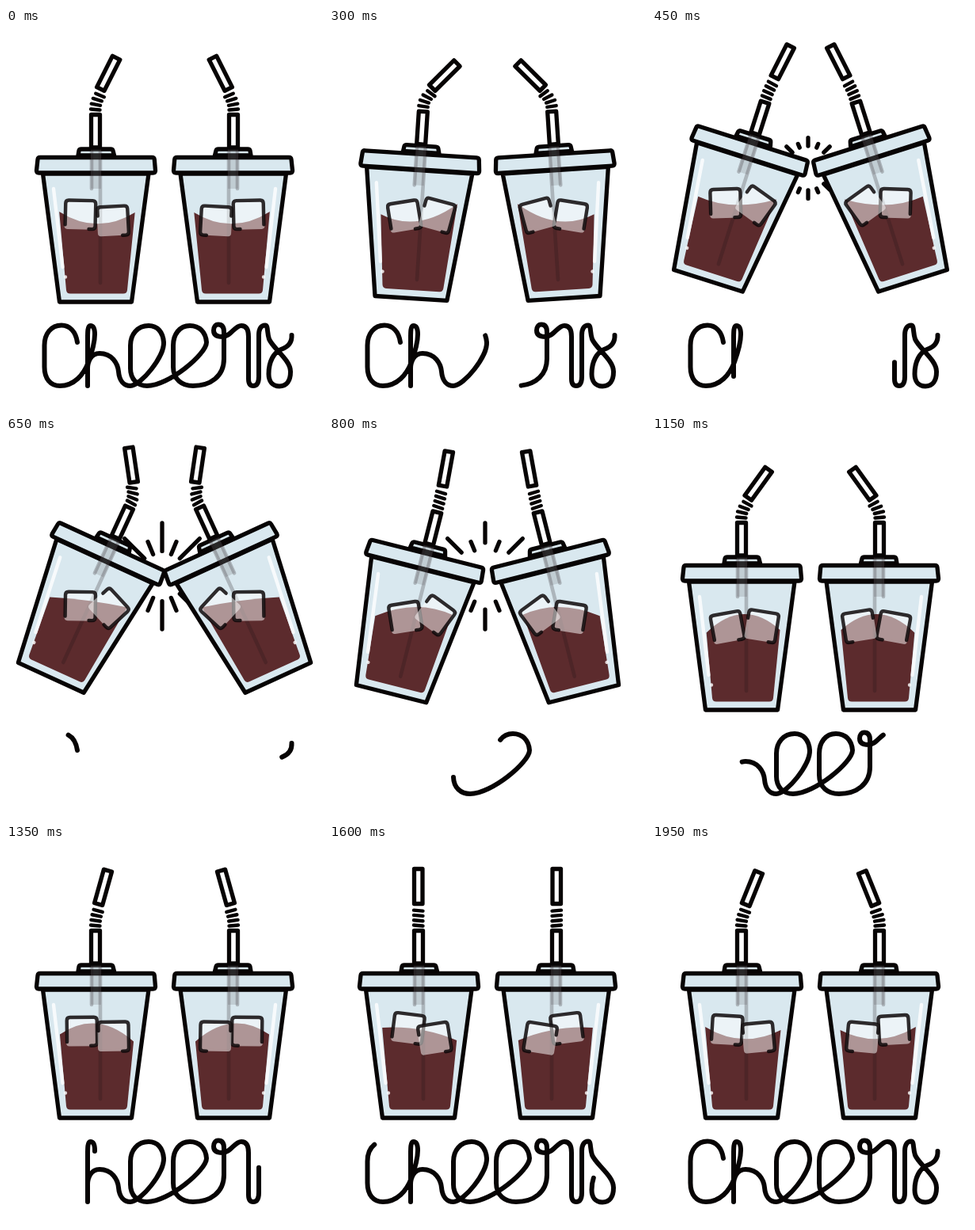
These frames come from a looping animation (400x480 px, 2 s). An HTML page:

```html
<!DOCTYPE html>
<html lang="en">
<head>
<meta charset="utf-8">
<title>Cheers</title>
<style>
  html, body { margin: 0; width: 100%; height: 100%; overflow: hidden; background: #fff; }
  svg { display: block; width: 400px; height: 480px; }
  .ink { stroke: #070404; stroke-width: 5.3; stroke-linejoin: round; stroke-linecap: round; }
  .glass { fill: #d9e8ef; }
  .none { fill: none; }
  .shade { stroke: #201416; stroke-opacity: .24; stroke-width: 4.6; stroke-linecap: round; }
  .shine { stroke: #fff; stroke-opacity: .8; stroke-width: 4.4; stroke-linecap: round; }
  .edge { stroke: #0c0809; stroke-opacity: .85; stroke-width: 4.4; stroke-linecap: round; stroke-linejoin: round; }
  .ice { fill: #fff; fill-opacity: .5; }
</style>
</head>
<body>
<svg viewBox="0 0 400 480">
  <path id="sparks" class="ink none"/>
  <g id="cup">
    <path class="ink glass" d="M46.5 184 67.5 346H158.5L180 184Z"/>
    <path id="drink" fill="#5c2b2d"/>
    <path class="ink glass" d="M91 161 92 155Q92.5 153 95 153H132Q134.5 153 135 155L136.5 161Z"/>
    <path class="ink glass" d="M43 163.5H184Q187 163.5 187.3 166L188.5 180Q188.5 183 185.5 183H41.5Q38.5 183 38.5 180L40 166Q40.3 163.5 43 163.5Z"/>
    <path fill="#808488" fill-opacity=".28" d="M107 153H120V203H107Z"/>
    <path class="shade none" d="M108 154V203M119 154V322"/>
    <g id="cubeA">
      <rect class="ice" x="-20" y="-18.5" width="40" height="37" rx="4"/>
      <path class="edge none" d="M-19 13V-14Q-19-18-15-18H15Q19-18 19-14V14Q19 18 15 18H11"/>
    </g>
    <g id="cubeB">
      <rect class="ice" x="-20" y="-19" width="40" height="38" rx="4"/>
      <path class="edge none" d="M-19-7V-14Q-19-18-15-18H15Q19-18 19-14V15Q19 19 15 19H11"/>
    </g>
    <path class="shine none" d="M60 203 71.5 302M75 314.5V314.6"/>
    <path class="ink" fill="#fff" d="M107.5 109.5H118.5V151H107.5Z"/>
    <g id="bellows"></g>
    <path id="tip" class="ink" fill="#fff" d="M107.5 31.5H118V75.5H107.5Z"/>
  </g>
  <use href="#cup" transform="translate(400) scale(-1 1)"/>
  <path id="word" class="ink none" style="stroke-width:6" pathLength="1" d="M90 397
    C88 383 80 375.5 70 375.5 C57 375.5 48.5 386 48.5 401 L48.5 428 C48.5 443 56 452 68 452
    C86 452 98 438 104 422 C109 408 112 396 112 387 C112 380 110 376 106.5 376 C103 376 103 384 103 392 L103 452
    L103 430 C103 422 107 411 118 411 C134 411 141 424 142 434 C143 446 149 452 157 452
    C170 452 200 415 199 397 C198 384 191 376 180 376 C166 376 157 387 157 401 L157 430
    C157 444 166 452 178 452 C205 452 253 412 253 397 C252 384 244 376 232 376
    C219 376 211 387 211 401 L211 428 C211 444 222 452 236 452 C258 452 275 440 275 418
    L275 384 C275 377 272 374.5 268 374.5 C264 374.5 262 378 262 382 C262 388 267 390 273 390
    C284 390 288 376 297 376 C304 376 306 382 306 390 L306 443 C306 449 308 452 312 452
    C317 452 319 448 319 440 L319 388 C319 380 322 375.5 327 375.5 C331 375.5 329 384 332 393
    C337 405 359 419 359 434 C359 446 354 452.5 345 452.5 C336 452.5 331.5 446 331.5 437
    C331.5 421 338 410 347 406 C356 403 361 397 360.5 388"/>
</svg>
<script>
const LOOP = 2000, STEP = 50;
const set = (id, name, value) => document.getElementById(id).setAttribute(name, value);
const ramp = (t, a, b) => Math.max(0, Math.min(1, (t - a) / (b - a)));
const smooth = x => (1 - Math.cos(Math.PI * x)) / 2;
// Cosine wave that crests at the given time
const wave = (t, crest, period = LOOP) => Math.cos(2 * Math.PI * (t - crest) / period);

// Crests and troughs of the swinging straw: [time, degrees]
const swing = [[-400, 0], [280, 42], [650, -33], [1000, 42], [1600, 0], [2280, 42]];
function bendAt(t) {
  const i = swing.findIndex(k => k[0] > t);
  const [t0, a] = swing[i - 1], [t1, b] = swing[i];
  return a + (b - a) * smooth(ramp(t, t0, t1));
}

const bellows = document.getElementById('bellows');
for (let i = 0; i < 4; i++) {
  const y = 102.5 - 6.3 * i;
  bellows.innerHTML += `<path class="ink" style="stroke-width:4.4" d="M107 ${y}L118.5 ${y + 1}"/>`;
}

function drawStraw(t) {
  const bend = bendAt(t);
  set('tip', 'transform', `rotate(${bend} 113 90)`);
  [...bellows.children].forEach((ring, i) =>
    ring.setAttribute('transform', `rotate(${bend * i / 4.5} 113 103)`));
}

// The wave crosses the cup from left to right
function drawDrink(t) {
  const left = 242.5 + 13 * wave(t, 800);
  const mid = 237 + 12 * wave(t, 170);
  const right = 236 + 14 * wave(t, 1430);
  const pull = 2 * mid - (left + right) / 2;
  set('drink', 'd', `M${67 + (left - 230) * .09} ${left}Q115 ${pull} ${163 - (right - 230) * .1} ${right}` +
    'L153 331Q152.5 335.5 148 335.5H81Q76.5 335.5 76 331Z');
}

function drawCubes(t) {
  const bob = wave(t, 700), drift = 5 * wave(t, 650, LOOP / 2);
  const place = (id, x, y, turn) => set(id, 'transform', `translate(${x} ${y}) rotate(${turn})`);
  place('cubeA', 99.5 + 4.5 * bob + drift, 240.5 + 8 * bob, -8 - 16 * bob);
  place('cubeB', 138 + 5 * bob, 240.5 - 5 * bob, 6.5 + 16.5 * bob);
}

function drawSparks(t) {
  const from = ramp(t, 600, 1150), to = ramp(t, 395, 600);
  let d = '';
  for (let i = 0; to > from && i < 16; i++) {
    const a = i * Math.PI / 8, reach = i % 2 ? 19 : 39;
    const at = p => `${197 + (28 + reach * p) * Math.sin(a)} ${177 - (28 + reach * p) * Math.cos(a)}`;
    d += `M${at(from)}L${at(to)}`;
  }
  set('sparks', 'd', d);
}

// The word opens up from its middle, then grows back from there
function drawWord(t) {
  const gap = ramp(t, 167, 667), grown = ramp(t, 667, 1667);
  const side = (1 - gap) / 2;
  const whole = gap === 0 || grown === 1;
  set('word', 'stroke-dasharray', whole ? 'none' : grown ? `${grown} 2` : `${side} ${gap} ${side} 2`);
  set('word', 'stroke-dashoffset', grown ? (grown - 1) / 2 : 0);
}

function draw(t) {
  const tilt = 25.5 * (smooth(ramp(t, 200, 600)) - smooth(ramp(t, 600, 1030)));
  set('cup', 'transform', `rotate(${tilt} 178 197)`);
  for (const part of [drawStraw, drawDrink, drawCubes, drawSparks, drawWord]) part(t);
}

const start = performance.now();
function frame() {
  const t = (performance.now() - start) % LOOP;
  draw(Math.floor(t / STEP) * STEP);
  requestAnimationFrame(frame);
}
frame();
</script>
</body>
</html>
```
